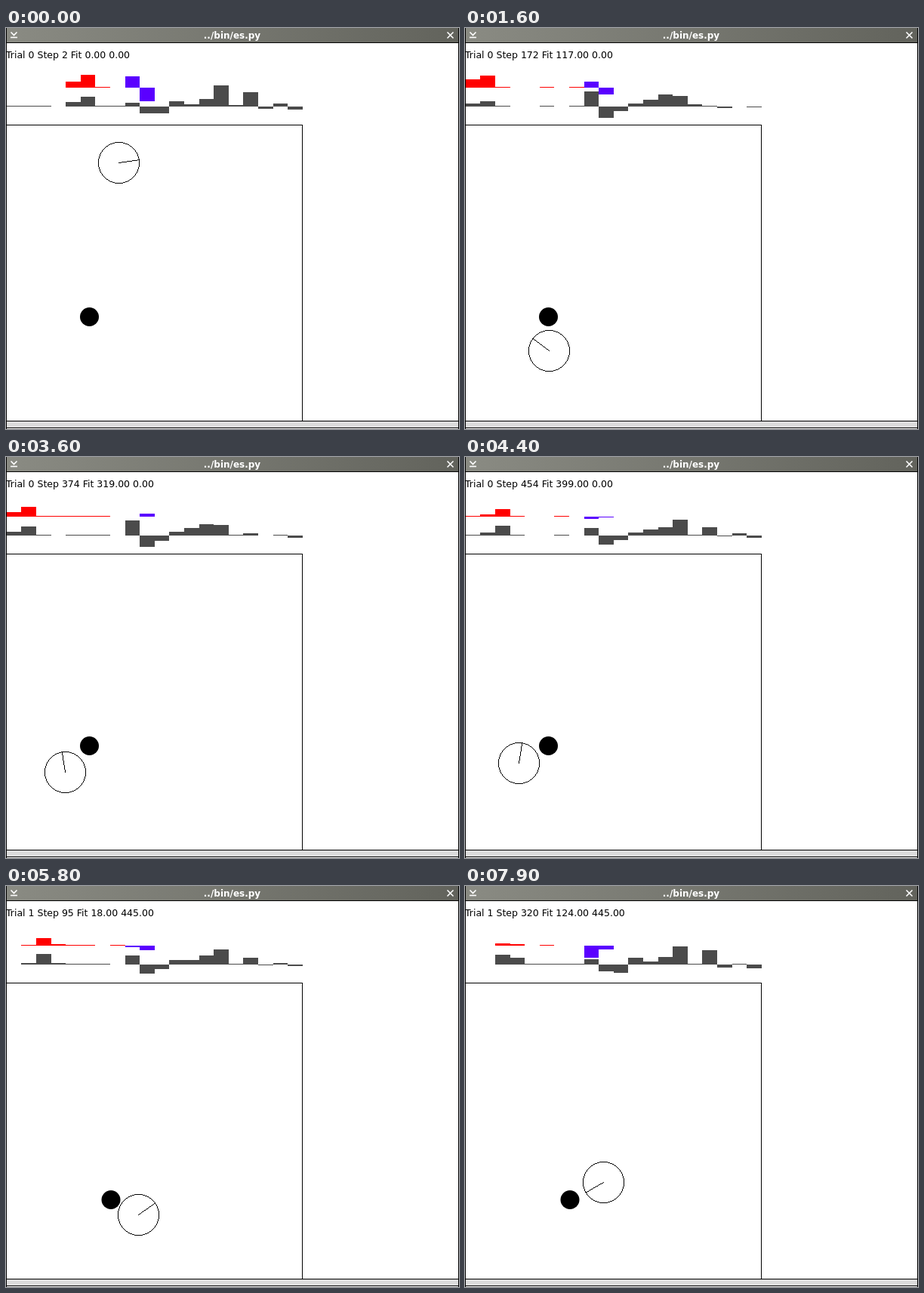
An HTML page with a canvas for the animation above (8000 ms loop, 600 by 531 pixels).

```html
<!DOCTYPE html>
<html lang="en">
<head>
<meta charset="utf-8">
<title>../bin/es.py</title>
<style>
html, body { margin: 0; width: 600px; height: 531px; overflow: hidden; background: #fff; }
canvas { position: absolute; left: 0; top: 0; }
div { position: absolute; white-space: pre; }
#title { left: 0; width: 599px; top: 3px; text-align: center; color: #fff; font: bold 12px/14px "DejaVu Sans", sans-serif; }
#status { left: 0; top: 29px; color: #000; font: 12.5px/14px "DejaVu Sans", sans-serif; }
</style>
</head>
<body>
<canvas id="stage" width="600" height="531"></canvas>
<div id="title">../bin/es.py</div>
<div id="status"></div>
<script>
const ctx = document.getElementById('stage').getContext('2d');
const status = document.getElementById('status');
const LOOP = 8000, TICK = 100, SECOND_TRIAL = 4850, DOCKED = 700;
const RED = '#ff0000', BLUE = '#5a00ff', GRAY = '#4b4b4b';
const rad = deg => deg * Math.PI / 180;
const lerp = (a, b, k) => a + (b - a) * k;
const clamp = (v, lo, hi) => Math.max(lo, Math.min(hi, v));

// Rows are [time, ...values]; values are interpolated linearly.
function track(rows, t) {
  let i = 0;
  while (i < rows.length - 2 && t >= rows[i + 1][0]) i++;
  const a = rows[i], b = rows[i + 1];
  const k = clamp((t - a[0]) / (b[0] - a[0]), 0, 1);
  return a.slice(1).map((v, j) => lerp(v, b[j + 1], k));
}

function noise(a, b) {
  const s = Math.sin(a * 12.9898 + b * 78.233) * 43758.5453;
  return s - Math.floor(s);
}

const steps = [
  [[0, 2], [1600, 172], [2500, 271], [3600, 374], [4800, 494]],
  [[4900, 9], [5100, 29], [6500, 161], [7900, 320]]
];

// Robot: time, x, y, heading
const firstPath = [
  [0, 149, 178, -8], [100, 203, 203, 50], [300, 222, 380, 100],
  [400, 186, 470, 140], [500, 145, 446, 190], [DOCKED, 126, 419, 197]
];
const secondPath = [
  [4900, 163, 225, 189], [5100, 45, 207, 189], [5200, 40, 250, 100],
  [5400, 84, 416, 72], [5500, 105, 470, 40], [5700, 150, 460, -35],
  [6400, 325, 286, -40], [6500, 344, 272, -22], [6700, 352, 306, 140],
  [7000, 190, 394, 150], [7900, 183, 392, 150]
];

function robotAt(t) {
  if (t >= SECOND_TRIAL) return track(secondPath, t);
  if (t < DOCKED) return track(firstPath, t);
  // Slow arc around the ball
  const s = (t - 1600) / 1000, a = rad(75.6 + 31.2 * s);
  return [103.2 + 33.3 * Math.cos(a), 394.8 + 33.3 * Math.sin(a), 216.5 + 22.3 * s];
}

// Time, sensor peak column, sensor height, input height, left motor, right motor, docked
const activity = [
  [0, 4.7, 20, 15, 15, -18, 0],
  [1600, 0.6, 22, 9, 8, -9, 1],
  [2500, 1.2, 18, 12, -5, -1, 1],
  [3600, 0.7, 16, 14, 0, 4, 1],
  [5100, 2.7, 7, 15, -5, -5, 0],
  [6500, 1.4, 13, 13, 1, -7, 0.9],
  [7900, 2.4, 4, 18, -16, -5, 0]
];
const roaming = [5, -8, -9, 7, 3, 10, 26, 1, 17, -2, 3, -5];
const docked = [20, -15, -6, 5, 11, 15, 14, 3, 2, -2, -1, -2];

function bar(col, base, v, color) {
  const h = Math.round(v);
  if (!h) return;
  const x = Math.round(0.8 + 19.6 * col), end = Math.round(20.4 + 19.6 * col);
  ctx.fillStyle = color;
  ctx.fillRect(x, h > 0 ? base - h : base, end - x, Math.abs(h));
}

function drawBars(t) {
  const [peak, high, input, left, right, near] = track(activity, t);
  const tick = t / TICK;
  for (let c = 0; c < 8; c++) {
    const hill = Math.exp(-2 * (c - peak) ** 2);
    bar(c, 79, Math.max(high * hill, noise(tick, c)), RED);
    bar(c, 104, Math.max(input * hill, noise(tick + 9, c)), GRAY);
  }
  roaming.forEach((v, c) => {
    bar(c + 8, 104, lerp(v, docked[c], near) + 4 * (noise(tick + 17, c) - 0.5), GRAY);
  });
  bar(8, 79, left, BLUE);
  bar(9, 79, right, BLUE);
}

const dot = (x, y) => ctx.fillRect(Math.round(x), Math.round(y), 1, 1);

function drawRobot([x, y, heading]) {
  const r = 27;
  x = Math.round(x);
  y = Math.round(y);
  ctx.fillStyle = '#000';
  for (let d = -19; d <= 19; d++) {
    const e = Math.round(Math.sqrt(r * r - d * d));
    dot(x + d, y - e);
    dot(x + d, y + e);
    dot(x - e, y + d);
    dot(x + e, y + d);
  }
  const dx = 26.5 * Math.cos(rad(heading)), dy = 26.5 * Math.sin(rad(heading));
  const n = Math.round(Math.max(Math.abs(dx), Math.abs(dy)));
  for (let j = 0; j <= n; j++) dot(x + dx * j / n, y + dy * j / n);
}

function polyline(...points) {
  ctx.beginPath();
  points.forEach(p => ctx.lineTo(...p));
  ctx.stroke();
}

function drawWindow() {
  ctx.fillStyle = '#fff';
  ctx.fillRect(0, 0, 600, 531);
  const g = ctx.createLinearGradient(0, 0, 600, 20);
  g.addColorStop(0, '#8a8b83');
  g.addColorStop(1, '#62635c');
  ctx.fillStyle = g;
  ctx.fillRect(0, 0, 600, 20);
  ctx.fillStyle = '#dcdcdc';
  ctx.fillRect(0, 521, 600, 8);
  ctx.fillStyle = '#000';
  for (const y of [19, 520, 529]) ctx.fillRect(0, y, 600, 1);
  for (const x of [0, 599]) ctx.fillRect(x, 0, 1, 531);
  ctx.fillRect(0, 128, 393, 1);
  ctx.fillRect(392, 128, 1, 392);
  ctx.strokeStyle = '#fff';
  ctx.lineWidth = 1.6;
  polyline([6.5, 5.5], [10.5, 9.5], [14.5, 5.5]);
  polyline([6, 12.5], [15, 12.5]);
  polyline([584.5, 5.5], [592.5, 13.5]);
  polyline([592.5, 5.5], [584.5, 13.5]);
}

function draw(t) {
  const trial = t < SECOND_TRIAL ? 0 : 1;
  const step = Math.round(track(steps[trial], t)[0]);
  const fit = trial ? clamp(step - 70, 0, 18) + Math.max(0, step - 214) : Math.max(0, step - 55);
  drawWindow();
  drawBars(t);
  ctx.fillStyle = '#000';
  ctx.beginPath();
  ctx.arc(trial ? 139 : 110.5, trial ? 415.5 : 382.5, 12.5, 0, 2 * Math.PI);
  ctx.fill();
  drawRobot(robotAt(t));
  status.textContent = `Trial ${trial} Step ${step} Fit ${fit.toFixed(2)} ${trial ? '445.00' : '0.00'}`;
}

const start = performance.now();
function loop(now) {
  const t = Math.max(0, now - start) % LOOP;
  draw(Math.floor(t / TICK) * TICK);
  requestAnimationFrame(loop);
}
draw(0);
requestAnimationFrame(loop);
</script>
</body>
</html>
```
